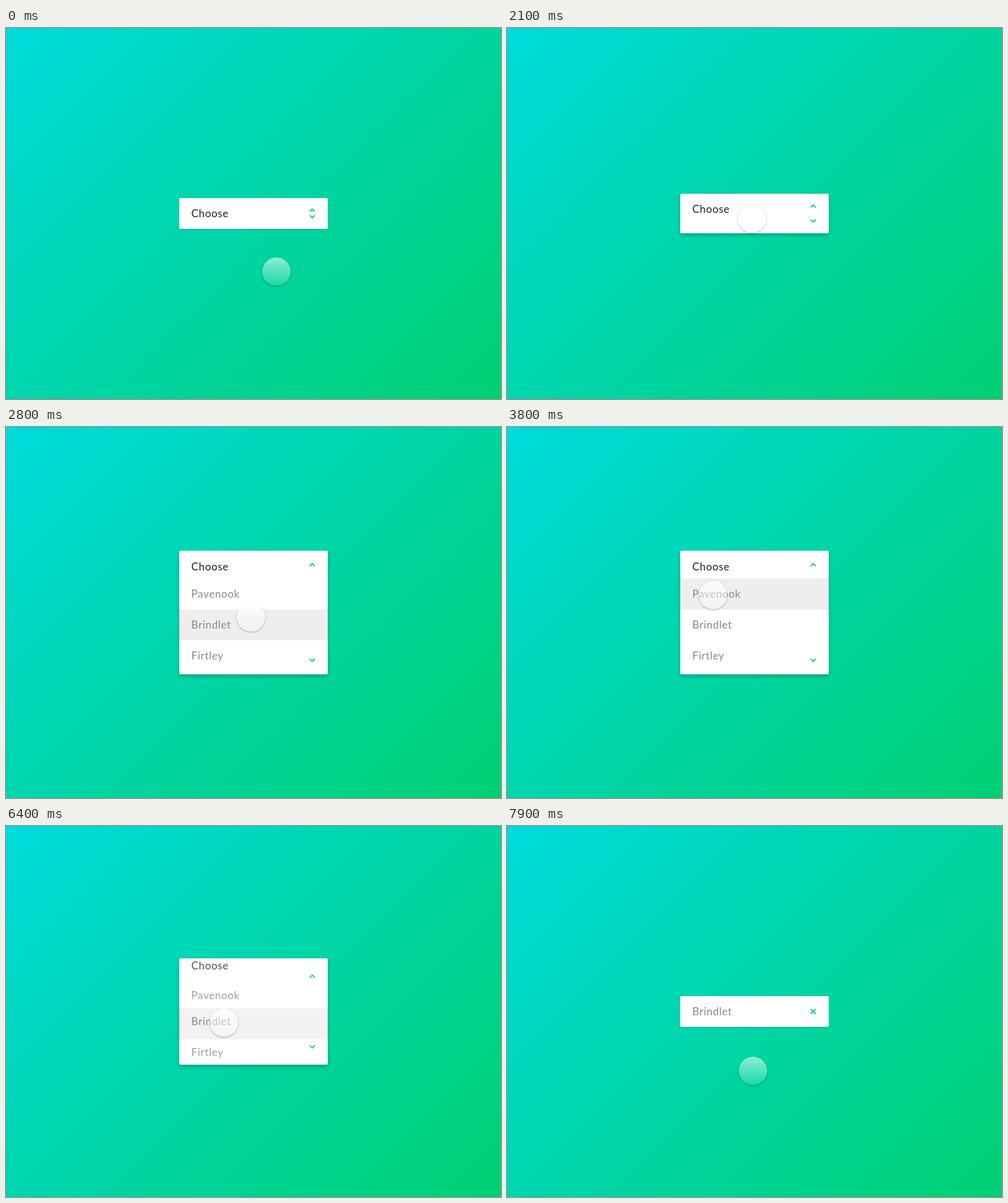
Recreate the animation shown at these times as an HTML page. Size 800 by 600 pixels, loop 8 s.

```html
<!DOCTYPE html>
<html lang="en">
<head>
<meta charset="utf-8">
<title>Select menu</title>
<style>
  html, body { margin: 0; width: 100%; height: 100%; overflow: hidden; }
  #stage {
    position: relative; width: 800px; height: 600px; overflow: hidden;
    background: linear-gradient(135deg, #00dbdc, #00d072);
  }
  #box {
    position: absolute; left: 280px; width: 240px;
    background: #fff; border-radius: 2px; overflow: hidden;
  }
  #box svg { position: absolute; left: -280px; }
  #cursor {
    position: absolute; left: -23px; top: -23px; width: 46px; height: 46px;
    border-radius: 50%; box-shadow: 0 1px 3px rgba(0, 0, 0, .3);
  }
  text { font: 17px Lato, "Open Sans", sans-serif; letter-spacing: .65px; fill: #888; }
  #label { fill: #222; }
  .row { fill: #eee; }
  path { fill: none; stroke: #1cc8a0; stroke-width: 2; }
</style>
</head>
<body>
<div id="stage">
  <div id="box">
    <svg id="content" width="800" height="600">
      <rect class="row" id="rowA" x="280" y="245" width="240" height="50"/>
      <rect class="row" id="rowB" x="280" y="295" width="240" height="50"/>
      <text id="label" x="299.5">Choose</text>
      <text id="itemA" x="299.5">Pavenook</text>
      <text id="itemB" x="299.5">Brindlet</text>
      <text id="itemC" x="299.5">Firtley</text>
      <path id="up" d="M-4 2 L0 -2 L4 2"/>
      <path id="down" d="M-4 -2 L0 2 L4 -2"/>
    </svg>
  </div>
  <div id="cursor"></div>
</div>
<script>
const LOOP = 8000;
const el = id => document.getElementById(id);
const mix = (a, b, p) => a + (b - a) * p;
const quad = p => p < .5 ? 2 * p * p : 1 - 2 * (1 - p) ** 2;
const sine = p => (1 - Math.cos(Math.PI * p)) / 2;
const out = p => 1 - (1 - p) ** 3;

// Eased progress from 0 to 1 between two times
const span = (t, from, to, ease = sine) =>
  ease(Math.min(1, Math.max(0, (t - from) / (to - from))));

// Cursor moves: start, end, x, y, x easing, y easing
const moves = [
  [450, 1100, 396, 308, sine, sine],
  [2850, 3400, 333, 272, sine, sine],
  [4500, 5300, 352, 318, p => out(Math.min(1, p * 1.8)), p => 1 - (1 - p) ** 2],
  [7500, 7930, 398, 397, sine, sine]
];

function cursorAt(t) {
  let x = 437, y = 394;
  for (const [from, to, nx, ny, easeX, easeY] of moves) {
    x = mix(x, nx, span(t, from, to, easeX));
    y = mix(y, ny, span(t, from, to, easeY));
  }
  return [x, y];
}

function placeText(id, center, opacity) {
  el(id).setAttribute("y", center + 6);
  el(id).style.opacity = opacity;
}

function placeArrow(id, y) {
  el(id).setAttribute("transform", `translate(495 ${y})`);
}

function draw(t) {
  const closing = t > 6300;
  const open = 1.035 * span(t, 2010, 2440, quad) - .035 * span(t, 2500, 2700);
  const close = span(t, 6300, 6660);
  const hover = span(t, 700, 1000) - span(t, 7500, 7900);
  const size = open * (1 - close);
  const top = 275 - 75 * size;

  const box = el("box");
  box.style.top = top + "px";
  box.style.height = 600 - 2 * top + "px";
  box.style.boxShadow =
    `0 ${mix(1, 3, hover)}px ${mix(2, 6, hover)}px rgba(0,0,0,${mix(.18, .25, hover)})`;
  el("content").style.top = -top + "px";

  const fold = Math.max(0, 1 - close * 1.15);
  placeText("label", closing ? 226 : mix(300, 226, open), fold);
  ["itemA", "itemB", "itemC"].forEach((id, i) => {
    const shown = span(t, 2480 + i * 30, 2780 + i * 30, out);
    const y = 270 + 50 * i - 10 * (1 - shown) + (i ? -20 : 20) * close;
    placeText(id, y, id === "itemB" ? shown : shown * fold);
  });

  const swap = span(t, 3050, 3250);
  const lit = span(t, 2500, 2780);
  const fade = Math.max(0, 1 - close * 1.4);
  el("rowA").style.opacity = closing ? 0 : swap;
  el("rowB").style.opacity = closing ? fade : lit * (1 - swap);

  // On closing the two arrows pass each other and meet as a cross
  const cross = span(t, 6300, 6600);
  const gap = mix(mix(5, 77, open), -2, cross);
  placeArrow("up", 300 - gap);
  placeArrow("down", 300 + gap);

  const [x, y] = cursorAt(t);
  const cursor = el("cursor");
  cursor.style.transform = `translate(${x}px, ${y}px)`;
  cursor.style.background = `linear-gradient(rgba(255,255,255,${mix(.56, .8, hover)}),
    rgba(255,255,255,${mix(.1, .2, hover)}))`;
}

const start = performance.now();
function tick() {
  draw((performance.now() - start) % LOOP);
  requestAnimationFrame(tick);
}
tick();
</script>
</body>
</html>
```
